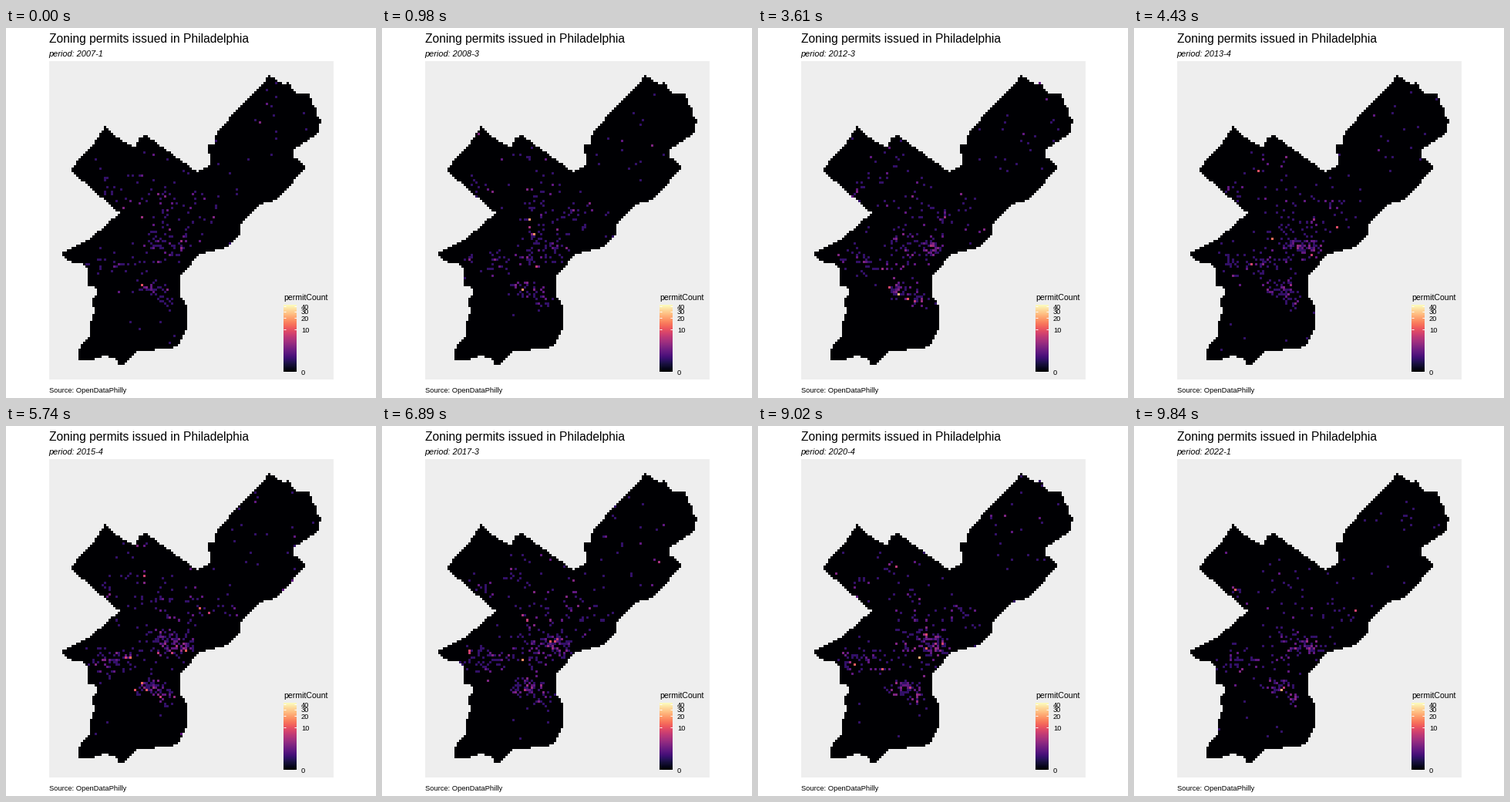
Animation, 480 px wide and 480 px high, one loop 10 s. Source, as a matplotlib script:

```python
import numpy as np
import matplotlib.pyplot as plt
from matplotlib.animation import FuncAnimation
from matplotlib.patches import Rectangle
from matplotlib.path import Path

LOOP_MS, STEP_MS = 10000, 20
QUARTERS = 61

# Raster grid in stage pixels
COLS, ROWS = 112, 125
LEFT, RIGHT, TOP, BOTTOM = 72.8, 408.2, 61.8, 437.3
DX, DY = (RIGHT - LEFT) / COLS, (BOTTOM - TOP) / ROWS
VMAX = np.log1p(43)

CITY_LIMITS = [
    (248, 188), (265, 179), (265, 165), (259, 158), (264, 152), (271, 152),
    (270, 141), (300, 105), (342, 62), (357, 73), (366, 72), (376, 86),
    (393, 86), (396, 98), (402, 105), (403, 116), (408, 120), (404, 137),
    (382, 153), (371, 159), (371, 168), (379, 171), (389, 182), (350, 224),
    (330, 229), (304, 254), (303, 267), (288, 284), (250, 294), (226, 322),
    (226, 347), (235, 364), (235, 390), (222, 414), (167, 421), (154, 437),
    (145, 436), (142, 428), (128, 426), (105, 432), (92, 432), (96, 411),
    (108, 402), (108, 387), (114, 369), (112, 353), (119, 343), (116, 337),
    (106, 335), (104, 307), (86, 305), (73, 296), (73, 292), (105, 276),
    (147, 241), (125, 222), (85, 187), (85, 182), (109, 157), (128, 129),
    (152, 149), (167, 155), (172, 145), (180, 139),
]

# Districts: centre, spread, permits per quarter early on and at the peak
DISTRICTS = [
    (198, 285, 15, 16, 45, 60),
    (226, 284, 9, 8, 14, 90),
    (187, 339, 10, 6, 28, 60),
    (207, 352, 6, 8, 12, 26),
    (150, 306, 14, 9, 18, 42),
    (122, 305, 10, 12, 5, 26),
    (205, 230, 24, 22, 38, 26),
    (258, 243, 22, 14, 18, 30),
    (131, 211, 7, 7, 9, 10),
    (172, 190, 16, 18, 10, 16),
    (335, 140, 38, 38, 16, 24),
]
CITYWIDE = 50


def city_mask():
    x = LEFT + (np.arange(COLS) + 0.5) * DX
    y = TOP + (np.arange(ROWS) + 0.5) * DY
    centres = np.stack(np.meshgrid(x, y), axis=-1).reshape(-1, 2)
    return Path(CITY_LIMITS).contains_points(centres).reshape(ROWS, COLS)


def permit_grid(q):
    """Log-scaled permit counts: growth to a peak, then a late decline."""
    rng = np.random.default_rng(2007 + q)
    decline = np.interp(q, [50, 60], [1, 0.55])
    growth = min(q / 50, 1)
    counts = np.zeros((ROWS, COLS))

    def issue(points, amounts):
        for (x, y), n in zip(points, amounts):
            if 79 < x < 402 and 64 < y < 422:
                counts[int((y - TOP) / DY), int((x - LEFT) / DX)] += n

    def usual(size):
        return rng.choice([1, 2, 3], size, p=[0.83, 0.13, 0.04])

    for cx, cy, sx, sy, early, peak in DISTRICTS:
        size = round((early + (peak - early) * growth) * decline)
        issue(rng.normal((cx, cy), (sx, sy), (size, 2)), usual(size))
        # a few bright blocks in the busy districts
        hot = rng.poisson(size / 40)
        issue(rng.normal((cx, cy), (sx, sy), (hot, 2)),
              np.minimum(4 + rng.exponential(6, hot), 38))
    issue(rng.uniform((LEFT, TOP), (RIGHT, BOTTOM), (CITYWIDE, 2)), usual(CITYWIDE))
    return np.ma.masked_where(~CITY, np.log1p(counts))


CITY = city_mask()
GRIDS = [permit_grid(q) for q in range(QUARTERS)]

fig = plt.figure(figsize=(5, 5), dpi=96, facecolor="white")
ax = fig.add_axes([0, 0, 1, 1])


def label(x, y, text, px, **kw):
    return ax.text(x, y, text, fontsize=px * 0.75, family="Liberation Sans",
                   color="black", va="baseline", **kw)


def raster(data, extent):
    return ax.imshow(data, extent=extent, cmap="magma", vmin=0, vmax=VMAX,
                     aspect="auto", interpolation="nearest", zorder=2)


ax.add_patch(Rectangle((56, 43), 369, 413, fc="#eeeeee", ec="none",
                       antialiased=False, zorder=1))
city = raster(GRIDS[0], (LEFT, RIGHT, BOTTOM, TOP))

label(56, 19, "Zoning permits issued in Philadelphia", 15.6)
subtitle = label(55.5, 37, "", 11, style="italic")
label(56, 473, "Source: OpenDataPhilly", 9.4)

# Colour bar on a log1p scale
label(360, 353, "permitCount", 10.45)
raster(np.linspace(VMAX, 0, 256)[:, None], (360, 377, 446, 359.5))
for n in (0, 10, 20, 30, 40):
    y = 446 - 86.5 * np.log1p(n) / VMAX
    for x in (360, 373.6):
        ax.plot([x, x + 3.4], [y, y], color="white", lw=0.7,
                solid_capstyle="butt", zorder=3)
    label(383, y + 3.5, str(n), 9.3)

ax.set(xlim=(0, 480), ylim=(480, 0))
ax.axis("off")


def update(step):
    # a quarter begins on the nearest 10 ms tick
    q = min(int((step * STEP_MS + 15) * QUARTERS / LOOP_MS), QUARTERS - 1)
    city.set_data(GRIDS[q])
    subtitle.set_text(f"period: {2007 + q // 4}-{q % 4 + 1}")
    return city, subtitle


anim = FuncAnimation(fig, update, frames=LOOP_MS // STEP_MS, interval=STEP_MS,
                     repeat=True, repeat_delay=0)
plt.show()
```
